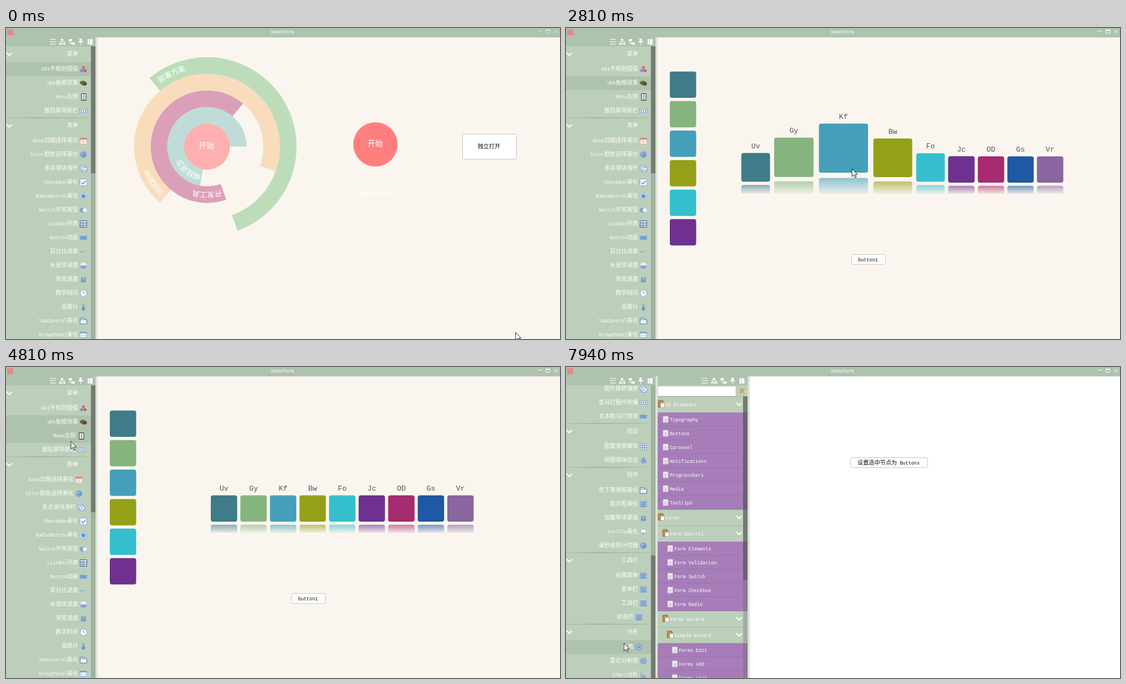
Animation, 998 px wide and 561 px high, one loop 7.99 s. Source, as an HTML page with a canvas:

```html
<!DOCTYPE html>
<html lang="zh-CN">
<head>
<meta charset="utf-8">
<title>DemoForm</title>
<style>
html, body { margin: 0; width: 100%; height: 100%; overflow: hidden; background: #faf6ef; }
canvas { display: block; width: 998px; height: 561px; }
</style>
</head>
<body>
<canvas id="stage" width="998" height="561"></canvas>
<script>
const g = document.getElementById('stage').getContext('2d');
const LOOP = 7990, ACTIVATE = 1000, DOCK_PAGE = 2200, MENU_PAGE = 5250;
const GREEN = '#bccfba', DARK = '#aec3ae', BLUE = '#7fa3d8', WHITE = '#fff';
const RAD = Math.PI / 180;
const clamp = v => Math.max(0, Math.min(1, v));

// ---- pointer and scrolling -------------------------------------------
const PATH = [
  [0, 918, 549], [70, 918, 549], [400, 640, 400], [820, 385, 240], [1000, 362, 225],
  [1250, 330, 190], [1640, 240, 110], [1950, 125, 94], [2130, 121, 92], [2230, 121, 93],
  [2350, 190, 200], [2480, 215, 240], [2600, 330, 248], [2810, 515, 254], [2960, 540, 256],
  [3150, 380, 255], [3300, 240, 250], [3430, 225, 345], [3560, 222, 295], [3750, 220, 200],
  [3950, 215, 325], [4190, 140, 290], [4400, 100, 290], [4765, 116, 163], [4790, 117, 135],
  [4810, 117, 134], [5200, 117, 130], [5450, 180, 218], [5740, 240, 222], [5970, 229, 112],
  [6150, 226, 120], [6350, 200, 200], [6500, 172, 258], [6630, 158, 230], [6920, 158, 230],
  [7450, 158, 537], [7650, 122, 452], [7740, 115, 455], [7870, 105, 497], [7990, 104, 499]
];

function pointer(t) {
  const i = Math.max(1, PATH.findIndex(p => p[0] >= t));
  const [t0, x0, y0] = PATH[i - 1], [t1, x1, y1] = PATH[i];
  const k = clamp((t - t0) / (t1 - t0));
  return { x: x0 + (x1 - x0) * k, y: y0 + (y1 - y0) * k };
}
const dragged = t => clamp((t - 6920) / 530);
const scrollAt = t => 718 * dragged(t);

// ---- menu data ---------------------------------------------------------
const SIDE = [
  '菜单:GDI不规则圆弧/balls,VEK鱼眼效果/nut,Menu左侧/menu,面包屑导航栏/crumbs',
  '表单:Date日期选择美化/date,Color颜色选择美化/disc,多点滑块滑杆/image,CheckBox美化/check,' +
    'RadioButton美化/radio,Switch开关按钮/switch,ListBox列表/list,Button动画/bar,百分比进度/dash,' +
    '水波纹进度/wave,渐变进度/pair,数字时间/clock,温度计/thermo,TabControl美化/folder,' +
    'GroupPanel美化/window,文本框美化/bar,下拉框美化/list,分页控件/crumbs',
  '特效:图片轮播/image,图片缩放/image,图片翻页/window,图片旋转播放/image,走马灯图片轮播/crumbs,文本跑马灯特效/bar',
  '验证:图案滑屏解锁/grid,拼图滑块验证/star',
  '组件:右下角弹窗美化/folder,提示框美化/lines,加载等待蒙版/pair,ToolTip美化/bubble,毫秒级别计时器/disc',
  '工具栏:右键菜单/lines,菜单栏/lines,工具栏/lines,状态栏/lines',
  '分析:仪表/gauge,雷达分析图/gauge,Chart分析/chart'
];
const NAV = [
  [0, 'UI Elements', 'Typography,Buttons,Carousel,Notifications,Progressbars,Media,Tooltips'],
  [0, 'Forms', ''],
  [1, 'Form Control', 'Form Elements,Form Validation,Form Switch,Form Checkbox,Form Radio'],
  [1, 'Forms Wizard', ''],
  [2, 'Simple Wizard', 'Forms Edit,Forms Add,Forms List']
];

function layout(top, groups) {
  const rows = [];
  let y = top;
  for (const { head, depth, items } of groups) {
    rows.push({ y, h: 29, head: true, depth, label: head });
    y += 29;
    for (const item of items) {
      const [label, icon] = item.split('/');
      rows.push({ y, h: 25, depth, label, icon });
      y += 25;
    }
  }
  return rows;
}
const sideRows = layout(33, SIDE.map(s => {
  const [head, list] = s.split(':');
  return { head, items: list.split(',') };
}));
const navRows = layout(53, NAV.map(([depth, head, list]) =>
  ({ depth, head, items: list ? list.split(',') : [] })));

function rowUnder(t) {
  const { x, y } = pointer(t);
  const inRow = (rows, py) => rows.find(r => !r.head && py >= r.y && py < r.y + r.h);
  if (x < 153 && y > 33) return inRow(sideRows, y + scrollAt(t));
  if (x > 165 && x < 319 && t > MENU_PAGE) return inRow(navRows, y);
}

// Rows slide 8px once touched and slide back a little after the pointer has left.
function slides(t) {
  const map = new Map();
  for (let back = 0; back < 300 && back < t; back += 5) {
    const row = rowUnder(t - back);
    if (row) map.set(row, Math.min(8, (map.get(row) || 0) + 0.8));
  }
  return map;
}

// ---- drawing helpers ---------------------------------------------------
function box(x, y, w, h, fill, stroke, r = 0) {
  g.beginPath();
  g.roundRect(x, y, w, h, r);
  if (fill) { g.fillStyle = fill; g.fill(); }
  if (stroke) { g.strokeStyle = stroke; g.lineWidth = 1; g.stroke(); }
}
function disc(x, y, r, fill, stroke) {
  g.beginPath();
  g.arc(x, y, r, 0, 7);
  if (fill) { g.fillStyle = fill; g.fill(); }
  if (stroke) { g.strokeStyle = stroke; g.lineWidth = 1; g.stroke(); }
}
function line(points, color, width = 1) {
  g.beginPath();
  points.forEach(([x, y]) => g.lineTo(x, y));
  g.strokeStyle = color;
  g.lineWidth = width;
  g.stroke();
}
// Latin letters take half the width of a Chinese character. align: 0 left, .5 centre, 1 right.
function text(str, x, y, { size = 10.2, color = WHITE, align = 0 } = {}) {
  const runs = str.match(/[ -~]+|[^ -~]+/g).map(s => {
    const latin = s < '\x7f';
    const font = latin ? `${size * 0.833}px "Liberation Mono", monospace`
      : `${size}px "Noto Sans CJK SC", "Noto Sans CJK", sans-serif`;
    g.font = font;
    return { s, font, w: g.measureText(s).width };
  });
  x -= align * runs.reduce((sum, r) => sum + r.w, 0);
  g.fillStyle = color;
  for (const r of runs) {
    g.font = r.font;
    g.fillText(r.s, x, y + size * 0.34);
    x += r.w;
  }
}
function clipped(x, y, w, h, draw) {
  g.save();
  g.beginPath();
  g.rect(x, y, w, h);
  g.clip();
  draw();
  g.restore();
}
const chevron = (x, y) => line([[x - 5, y - 3], [x, y + 2], [x + 5, y - 3]], WHITE, 2);
const stripes = (x, y, w, n, gap, color) => {
  for (let i = 0; i < n; i++) box(x, y + i * gap, w, 1, color);
};

// Small row icons, centred on 0,0.
const ICONS = {
  balls() { disc(0, -3, 2.8, '#d8697c'); disc(-3, 2.5, 2.8, '#6d8fd0'); disc(3, 2.5, 2.8, '#cf5670'); },
  nut() { g.beginPath(); g.ellipse(0, 0, 6.5, 4, 0.25, 0, 7); g.fillStyle = '#6d6239'; g.fill(); disc(3, 1.5, 2.5, '#4d4a2c'); },
  menu() { box(-3.5, -6, 8, 12, WHITE, '#222'); stripes(-1, -4, 3, 4, 2.6, '#222'); },
  crumbs() { box(-7, -3, 14, 6, '#e9eef6', BLUE); for (let i = -5; i < 6; i += 4) box(i, -1, 2, 2, '#4d6f9f'); },
  date() { box(-5.5, -5, 11, 11, WHITE, '#d8b8b0'); box(-6, -5.5, 12, 3.5, '#d98577'); stripes(-3, 0, 6, 2, 3, '#d98577'); },
  disc() { disc(0, 0, 6, BLUE); disc(-2, -2, 1.2, '#bcd'); disc(2, 1, 1.2, '#57b'); },
  image() { box(-6, -5, 9, 8, '#dce6f3', BLUE); box(-3, -2, 9, 8, '#eef3fa', BLUE); line([[-2, 5], [1, 1], [5, 5]], '#57b'); },
  check() { box(-6, -6, 12, 12, WHITE, BLUE, 1); line([[-3, 0], [-1, 3], [4, -3]], '#5f86c4', 1.6); },
  radio() { disc(0, 0, 6, WHITE, BLUE); disc(0, 0, 4.2, '#6b95d6'); },
  switch() { box(-6.5, -4, 13, 8, BLUE, null, 4); disc(2.5, 0, 3.5, WHITE); },
  list() { box(-6, -6, 12, 12, '#dfe8f4', '#45608a'); stripes(-6, -2, 12, 2, 4, '#45608a'); stripes(-4, -4, 6, 3, 4, '#7890b4'); },
  bar() { box(-6.5, -3.5, 13, 7, BLUE); box(-2, -0.5, 4, 1, '#5c86c6'); },
  dash() { box(-5, -1, 5, 2, BLUE); box(1, -1, 3, 2, '#a9bfd8'); },
  wave() { disc(0, 0, 6, '#e7eef5'); g.beginPath(); g.arc(0, 0, 6, 0, Math.PI); g.fillStyle = BLUE; g.fill(); },
  pair() { box(-4.5, -4, 4, 8, BLUE); box(0.5, -4, 4, 8, BLUE); box(-4.5, 2, 9, 3, '#6f95cd'); },
  clock() { disc(0, 0, 6, WHITE, BLUE); line([[0, -4], [0, 0], [3, 0]], '#6a8fc4'); },
  thermo() { box(-1.5, -6, 3, 8, BLUE, null, 1.5); disc(0, 3, 3.2, '#6c96d4'); },
  folder() { box(-6, -5, 8, 4, WHITE, '#57779f'); box(-6, -2.5, 12, 8, '#eef3fa', '#57779f'); },
  window() { box(-6, -5, 12, 10, WHITE, BLUE); box(-6, -5, 12, 2.5, BLUE); stripes(-4, 0, 3, 2, 2, BLUE); stripes(1, 0, 3, 2, 2, BLUE); },
  grid() { box(-6, -6, 12, 12, '#7f9fd0'); for (let i = 0; i < 9; i++) disc(i % 3 * 4 - 4, (i / 3 | 0) * 4 - 4, 1.3, WHITE); },
  star() { box(-4, -3, 8, 8, BLUE, null, 2); disc(0, -3, 2.5, BLUE); disc(4, 1, 2, BLUE); },
  lines() { box(-5.5, -5, 11, 10, '#9db9dc', BLUE); stripes(-4, -3, 8, 3, 3, '#5f86bc'); },
  bubble() { box(-5, -5, 10, 7, WHITE, BLUE, 3); line([[-1, 2], [0, 5], [2, 2]], BLUE); },
  gauge() { disc(0, 0, 6, BLUE); disc(0, 0, 3.5, '#a9c2e6'); disc(0, 0, 1.4, '#4b73b0'); },
  chart() { line([[-5, -4], [-5, 5], [6, 5]], BLUE); g.beginPath(); g.moveTo(-4, 4); g.lineTo(-1, -1); g.lineTo(6, 4); g.fillStyle = BLUE; g.fill(); }
};

function toolbar(x) {
  box(x, 17, 161, 16, DARK);
  stripes(x + 79, 20, 11, 3, 4.3, WHITE);
  box(x + 99, 20, 4, 3, WHITE);
  line([[x + 98, 27], [x + 98, 24.5], [x + 105, 24.5], [x + 105, 27]], WHITE);
  for (let i = 0; i < 3; i++) box(x + 96 + i * 4, 27, 3, 3, WHITE);
  box(x + 113, 20, 6, 4, WHITE);
  box(x + 118, 26, 6, 4, WHITE);
  line([[x + 115, 24], [x + 115, 28], [x + 118, 28]], WHITE);
  box(x + 132.5, 19, 4, 5, WHITE);
  box(x + 130.5, 24, 8, 2, WHITE);
  box(x + 134, 26, 1, 5, WHITE);
  box(x + 147, 20, 3, 10, WHITE);
  box(x + 151, 20, 5, 10, WHITE);
}
function scrollbar(x, top, y, h) {
  box(x, top, 8, 561 - top, 'rgba(90,95,90,.28)');
  box(x, y, 8, h, 'rgba(70,75,72,.5)');
}
function divider(x) {
  const fade = g.createLinearGradient(x, 0, x + 5, 0);
  fade.addColorStop(0, '#cbd8c9');
  fade.addColorStop(1, '#f3f2ee');
  box(x, 17, 5, 544, fade);
}

// ---- window parts ------------------------------------------------------
function titleBar(t) {
  box(0, 0, 998, 17, DARK);
  box(2, 2, 11, 11, '#e08a86');
  text('DemoForm', 498, 7, { align: 0.5 });
  g.globalAlpha = t < ACTIVATE ? 0.45 : 1;
  box(957, 5, 8, 1, WHITE);
  box(972.5, 3.5, 7, 6, null, WHITE);
  box(972, 3, 8, 2, WHITE);
  line([[987, 3], [995, 10]], WHITE);
  line([[995, 3], [987, 10]], WHITE);
  g.globalAlpha = 1;
}

function sidebar(t, slide) {
  const hovered = rowUnder(t);
  const selected = sideRows[t < DOCK_PAGE ? 1 : t < MENU_PAGE ? 2 : 3];
  box(0, 17, 161, 544, GREEN);
  clipped(0, 33, 161, 528, () => {
    g.translate(0, -scrollAt(t));
    for (const row of sideRows) {
      const mid = row.y + row.h / 2;
      if (row.head) {
        if (row.y > 33) {
          const rule = g.createLinearGradient(0, 0, 153, 0);
          rule.addColorStop(0, '#a9bda6');
          rule.addColorStop(0.4, '#879d85');
          rule.addColorStop(1, '#a9bda6');
          box(0, row.y - 0.5, 153, 1, rule);
        }
        chevron(6, mid);
        text(row.label, 130, mid - 0.5, { align: 1 });
        continue;
      }
      if (row === selected || row === hovered) box(0, row.y, 153, 25, DARK);
      const dx = -(slide.get(row) || 0);
      text(row.label, 130 + dx, mid - 0.5, { align: 1 });
      g.save();
      g.translate(139.5 + dx, mid);
      ICONS[row.icon]();
      g.restore();
    }
  });
  scrollbar(153, 33, 33 + 307 * dragged(t), 229);
  toolbar(0);
  divider(161);
}

const RINGS = [
  // inner radius, start, sweep, colour, label, label angle
  [41.5, 100, 260, '#c0dcd9', '编程语言', 129],
  [71.5, 70, 240, '#db9fba', '开发工具', 90],
  [101.5, 130, 250, '#f9dcbc', '测试软件', 146],
  [131.5, 230, 200, '#bdddba', '部署方案', 244]
];
function arcPage(t) {
  const p = pointer(t), dx = p.x - 362, dy = p.y - 214;
  const dist = Math.hypot(dx, dy), angle = Math.atan2(dy, dx) / RAD;
  g.save();
  g.translate(362, 214);
  for (const [r, from, sweep, color, label, middle] of RINGS) {
    const hover = dist > r && dist < r + 30 && (angle - from + 720) % 360 < sweep;
    g.beginPath();
    g.arc(0, 0, r + 30, from * RAD, (from + sweep) * RAD);
    g.arc(0, 0, r, (from + sweep) * RAD, from * RAD, true);
    g.fillStyle = color;
    g.fill();
    if (hover) {
      g.globalCompositeOperation = 'multiply';
      g.fill();
      g.globalCompositeOperation = 'source-over';
    }
    [...label].forEach((ch, i) => {
      g.save();
      g.rotate((middle + 90) * RAD + (i - 1.5) * 13.3 / (r + 15));
      text(ch, 0, -r - 15, { size: 13.3, align: 0.5 });
      g.restore();
    });
  }
  g.restore();
  disc(362, 214, t < 820 ? 41.5 : 40, '#fdb0af');
  text('开始', 361, 212, { size: 14, align: 0.5 });
  disc(665.5, 210, 40, '#ff7f7f');
  text('开始', 665, 208, { size: 14, align: 0.5 });
  text('单独主题打开', 664, 300, { align: 0.5 });
  button(822.5, 191.5, 97, 45, '独立打开');
}

function button(x, y, w, h, label) {
  box(x, y, w, h, WHITE, '#c4c4c4', 3);
  text(label, x + w / 2 - 1, y + h / 2, { color: '#111', align: 0.5 });
}

const TILES = [
  ['Uv', '#3f7b89'], ['Gy', '#86b47f'], ['Kf', '#469fb8'], ['Bw', '#94a017'], ['Fo', '#35bfcc'],
  ['Jc', '#6e3190'], ['OD', '#a62b70'], ['Gs', '#1f59a3'], ['Vr', '#8a659f']
];
const CELL = 53.25, TILE = 47.5;
// Fisheye: tiles near the focus swell, and the row stays centred.
function fisheye(count, center, focus, gain) {
  const sizes = Array.from({ length: count }, (_, i) => {
    const d = center + (i - (count - 1) / 2) * CELL - focus;
    return TILE + gain * Math.exp(-d * d / 4900);
  });
  const pad = CELL / TILE;
  let pos = center - sizes.reduce((a, s) => a + s * pad, 0) / 2;
  return sizes.map(s => {
    const start = pos + s * (pad - 1) / 2;
    pos += s * pad;
    return { start, s };
  });
}
function dockPage(t) {
  const p = pointer(t);
  const overRow = t > 2590 && t < 3220;
  const overColumn = !overRow && p.x > 180 && p.x < 270;
  fisheye(6, 235.3, p.y - 6, overColumn ? 37 : 0).forEach(({ start, s }, i) =>
    box(187 + (s - TILE) * 0.06, start, s, s, TILES[i][1], null, 4));
  fisheye(9, 605.7, p.x - 17, overRow ? 41 : 0).forEach(({ start, s }, i) => {
    const [label, color] = TILES[i], grow = s - TILE;
    const bottom = 279 - grow * 0.44, mirror = bottom + 5.5 + grow * 0.1;
    box(start, bottom - s, s, s, color, null, 4);
    text(label, start + s / 2, bottom - s - 14, { size: 16, color: '#555', align: 0.5 });
    const fade = g.createLinearGradient(0, mirror, 0, 299);
    fade.addColorStop(0, color + '99');
    fade.addColorStop(1, color + '18');
    box(start, mirror, s, 299 - mirror, fade, null, [4, 4, 0, 0]);
  });
  button(514.5, 408.5, 61, 18, 'button1');
}

function navPage(t, slide) {
  const hovered = rowUnder(t);
  box(165, 17, 162, 544, GREEN);
  toolbar(165.5);
  box(166, 35, 139.5, 17, WHITE);
  line([[313, 39], [321, 47]], '#d9a05a', 3);
  line([[321, 39], [313, 47]], '#d9a05a', 3);
  for (const row of navRows) {
    const mid = row.y + row.h / 2, x = 179 + row.depth * 8.2;
    if (row.head) {
      box(165, row.y, 162, 1, '#a6baa3');
      box(x - 13, mid - 7, 9, 12, '#c98d45', '#8d6430', 1);
      box(x - 10.5, mid - 8, 4, 2.5, '#8a8a80');
      box(x - 8.5, mid - 2.5, 7, 8, WHITE, '#9aa');
      text(row.label, x, mid);
      chevron(312, mid);
      continue;
    }
    box(165, row.y, 162, 25, row === hovered ? '#8a6599' : '#a67db8');
    box(165, row.y + 24, 162, 1, '#9971ab');
    const left = x + 8 + (slide.get(row) || 0);
    box(left - 12, mid - 5.5, 9, 11, '#f4f1f5', '#cbbfd2');
    stripes(left - 10, mid - 2, 5, 3, 2.5, '#b5a9bd');
    text(row.label, left, mid);
  }
  scrollbar(319, 53, 53, 331);
  divider(327);
  button(512.5, 163.5, 139, 18, '设置选中节点为 Buttons');
}

function arrow({ x, y }) {
  g.beginPath();
  [[0, 0], [0, 14], [3.2, 11], [5.6, 16], [7.8, 15], [5.4, 10.3], [9.8, 10.3]]
    .forEach(([px, py]) => g.lineTo(x + px, y + py));
  g.closePath();
  g.fillStyle = WHITE;
  g.fill();
  g.strokeStyle = '#222';
  g.lineWidth = 1;
  g.stroke();
}

function frame(now) {
  const t = now % LOOP, slide = slides(t);
  box(0, 0, 998, 561, t < MENU_PAGE ? '#faf6ef' : WHITE);
  sidebar(t, slide);
  if (t < DOCK_PAGE) arcPage(t);
  else if (t < MENU_PAGE) dockPage(t);
  else navPage(t, slide);
  titleBar(t);
  arrow(pointer(t));
  requestAnimationFrame(frame);
}
requestAnimationFrame(frame);
</script>
</body>
</html>
```
